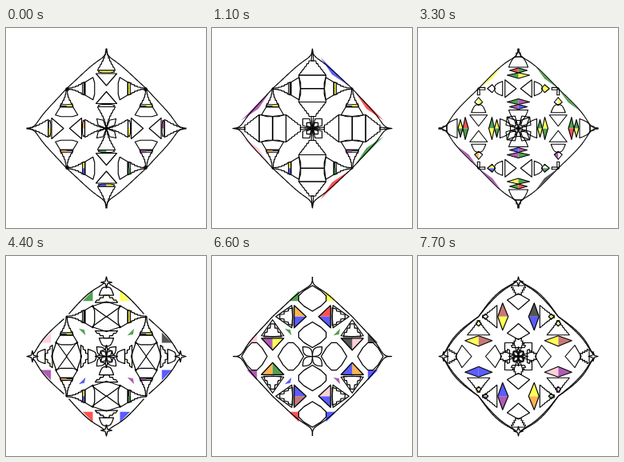
An HTML page with a canvas that plays this animation: 250 by 250 pixels, repeating every 8000 ms.

```html
<!DOCTYPE html>
<html lang="en">
<head>
<meta charset="utf-8">
<title>Ornament</title>
<style>
  html, body { margin: 0; width: 100%; height: 100%; overflow: hidden; background: #fff; }
  canvas { display: block; width: 100vw; height: 100vh; }
</style>
</head>
<body>
<canvas id="stage"></canvas>
<script>
const LOOP = 8000, HOLD = 1100, TIP = 99.5, NODE = TIP / 2;
const COLORS = {
  r: '#ff5252', y: '#ffff55', b: '#5c5cff', g: '#52a052', p: '#b05cb4',
  o: '#ffb452', i: '#ffd0d8', m: '#c87878', k: '#555558'
};
const RANDOM_PICK = 'rybgpo....';

// Each builder returns half an outline: points [distance along axis, half width].
const sample = (n, f) => Array.from({ length: n + 1 }, (_, i) => f(i / n));
const kite = (from, widest, width, to) => [[from, 0], [widest, width], [to, 0]];
const star = r => [[0, 0], [r * .8, r * .2], [r, r], [r * 1.2, r * .2], [r * 2, 0]];
const flask = (from, to, w0, w1, bow) =>
  [[from, 0], [from, w0], [to, w1], [to + bow, w1 / 2], [to + bow, 0]];
const lobe = (from, to, width, n = 10) =>
  sample(n, t => [from + (to - from) * t, width * Math.sin(Math.PI * t)]);
const curve = (from, to, w0, w1, power) =>
  [[from, 0], ...sample(10, t => [from + (to - from) * t, w0 + (w1 - w0) * t ** power])];
const steps = (from, to, w0, w1, count, power = 1) => {
  const height = (to - from) / count;
  const rings = sample(count - 1 || 1, t => w0 + (w1 - w0) * t ** power);
  return [[from, 0], ...rings.slice(0, count).flatMap((w, i) =>
    [[from + i * height, w * .85], [from + (i + 1) * height, w]])];
};
const sliver = (w0, w1, depth) => [[70, w0], [70 - depth, (w0 + w1) / 2], [70, w1]];
const border = (bulge, dip, t0 = 0, t1 = 1) => sample(40, s => {
  const t = t1 + (t0 - t1) * s;
  return [70.4 + bulge * Math.sin(Math.PI * t) - dip * Math.sin(Math.PI * t ** 5), 70.4 * t];
});
const paint = (points, colors, outlined = true) => ({ points, colors, outlined });

// axis: towers on the main axes; side: towers at the four edge nodes;
// quad: diagonal shapes from the centre; edge: open borders between the tips
const spires = {
  line: 1.15,
  axis: [steps(0, 27, .6, 11, 7, 1.5), paint(flask(27, 29, 9, 10, 1)), kite(31, 31, 13, 46)],
  side: [steps(0, 22, .8, 8, 6, 2), paint(flask(20, 23, 7, 8, 0)), flask(23, 33, 8, 14, 2)],
  quad: [kite(0, 10, 4.5, 17), paint(kite(67, 69, 2, 71))],
  edge: [border(-1, 4)]
};
const stars = {
  line: 1.25,
  axis: [star(7), curve(13, 23, 3, 9, .5), paint(steps(23, 32, 4, 14, 3)), kite(31, 37, 18, 50)],
  side: [paint(kite(13, 20, 7, 21)), steps(21, 32, 4, 14, 3)],
  quad: [kite(0, 11, 6, 17), kite(2, 7, 3, 10), paint(sliver(56, 5, 5), 'brgr.ip.', false)],
  edge: [border(1.5, 4, .06, .9)]
};
const spindles = {
  line: 1.1,
  axis: [steps(0, 10, .8, 3, 2), curve(10, 23, 3, 12, .5),
         paint(kite(24, 27, 11, 30), 'grbpygyg'), paint(kite(30, 33, 14, 37), 'ygpgrggy')],
  side: [steps(0, 8, 1.5, 1.5, 1), paint(kite(11, 17, 5, 21)),
         curve(20, 30, 2, 9, .5), kite(33, 33, 11, 47)],
  quad: [kite(0, 14, 8, 20), kite(4, 11, 4, 20), paint(sliver(40, 2, 3), 'gg.kpp.y', false)],
  edge: [border(.5, 4)]
};
const lanterns = {
  line: 1.15,
  axis: [curve(0, 15, 0, 1.5, 1), steps(15, 33, 5, 17, 5), flask(33, 50, 17, 15, 0)],
  side: [curve(0, 12, .3, .8, 1), paint(curve(12, 20, 2, 5, .5)),
         steps(20, 28, 5, 7, 2), flask(28, 34, 7, 15, 1)],
  quad: [kite(0, 20, 5, 52)],
  edge: [border(-1, 3)]
};
const trefoils = {
  line: 1.25,
  axis: [lobe(11, 43, 18, 5)],
  side: [steps(9, 25, 3, 11, 3), kite(4, 24, 14, 25),
         paint(kite(27, 27, 14, 42), 'rbobobikmbbipyog')],
  quad: [lobe(0, 17, 5), paint(sliver(46, 28, 9), 'ykbbrpig', false),
         paint(kite(37, 43, 4, 49), '.gp.b.', false)],
  edge: [border(-1, 5)]
};
const kites = {
  line: 1.15,
  axis: [star(6), steps(11, 22, 9, 4, 4), kite(21, 29, 14, 41)],
  side: [steps(5, 23, 2, 14, 6, 1.2), paint(kite(5, 9, 3, 12)),
         paint(kite(24, 30, 17, 37), 'kbmypimypboyymbb')],
  quad: [lobe(0, 9, 4), kite(0, 16, 8, 24)],
  edge: [border(4, 3, 0, .93), border(2.5, 3, 0, .93)]
};

const SCENES = [
  spires,
  { ...spires, axis: lanterns.axis, quad: stars.quad },
  stars,
  spindles,
  { ...stars, side: spires.side, quad: trefoils.quad },
  lanterns,
  trefoils,
  kites
];

const diagonal = ([u, w]) => [(u - w) * Math.SQRT1_2, (u + w) * Math.SQRT1_2];
const PLACES = {
  edge: [diagonal],
  quad: [diagonal],
  axis: [([u, w]) => [w, TIP - u], ([u, w]) => [w, u]],
  side: [([u, w]) => [NODE - u, NODE + w], ([u, w]) => [u - NODE, NODE + w]]
};

const canvas = document.getElementById('stage');
const ctx = canvas.getContext('2d');

function turn([x, y], quarter) {
  for (let k = 0; k < quarter; k++) [x, y] = [y, -x];
  return [x, -y];
}

function trace(points, closed) {
  ctx.beginPath();
  points.forEach(p => ctx.lineTo(...p));
  if (closed) ctx.closePath();
}

function pickColor(colors, index) {
  if (colors) return COLORS[colors[index % colors.length]];
  const noise = Math.abs(Math.sin(index * 12.99 + 4.7) * 43758.5) % 1;
  return COLORS[RANDOM_PICK[Math.floor(noise * RANDOM_PICK.length)]];
}

function drawShape(shape, kind) {
  const painted = !Array.isArray(shape);
  const half = painted ? shape.points : shape;
  const mirrored = half.map(([u, w]) => [u, -w]);
  let index = 0;
  for (let quarter = 0; quarter < 4; quarter++) {
    for (const map of PLACES[kind]) {
      const sides = [half, mirrored].map(side => side.map(p => turn(map(p), quarter)));
      if (painted) for (const side of sides) {
        const color = pickColor(shape.colors, index++);
        if (!color) continue;
        trace(side, true);
        ctx.fillStyle = color;
        ctx.fill();
      }
      if (painted && !shape.outlined) continue;
      if (kind === 'edge') {
        for (const side of sides) {
          trace(side, false);
          ctx.stroke();
        }
      } else {
        trace([...sides[0], ...sides[1].reverse()], true);
        ctx.stroke();
      }
    }
  }
}

function drawScene(scene) {
  const ratio = devicePixelRatio || 1;
  canvas.width = innerWidth * ratio;
  canvas.height = innerHeight * ratio;
  ctx.fillStyle = '#fff';
  ctx.fillRect(0, 0, canvas.width, canvas.height);
  ctx.scale(canvas.width / 250, canvas.height / 250);
  ctx.translate(125.5, 125.5);
  ctx.lineWidth = scene.line;
  ctx.lineJoin = 'round';
  ctx.strokeStyle = '#000';
  for (const kind of ['quad', 'edge', 'axis', 'side']) {
    scene[kind].forEach(shape => drawShape(shape, kind));
  }
}

const start = performance.now();
function frame() {
  const time = (performance.now() - start) % LOOP;
  drawScene(SCENES[Math.floor(time / HOLD)]);
  requestAnimationFrame(frame);
}
frame();
</script>
</body>
</html>
```
